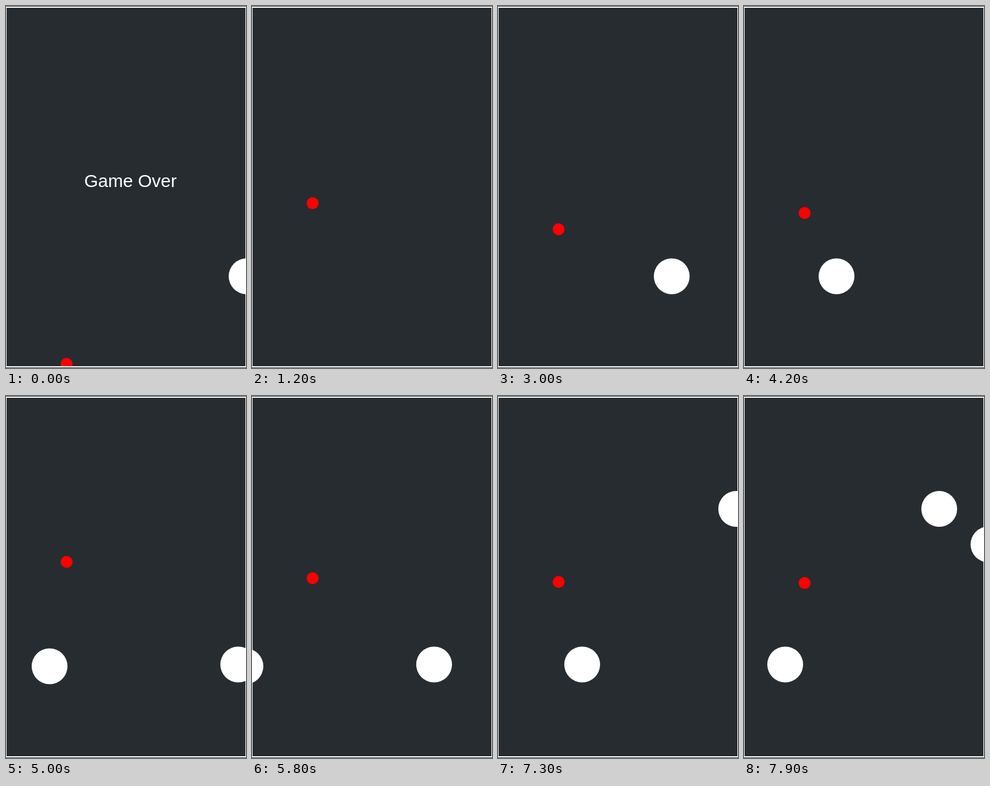
Write an HTML page with a canvas that moves like this. It is 402 px wide and 606 px high and loops after 8 s.

```html
<!DOCTYPE html>
<html lang="en">
<head>
<meta charset="utf-8">
<title>Bouncing ball game</title>
<style>
  html, body { margin: 0; width: 100%; height: 100%; overflow: hidden; background: #272c30; }
  canvas { display: block; }
</style>
</head>
<body>
<canvas id="stage" width="402" height="606"></canvas>
<script>
const ctx = document.getElementById('stage').getContext('2d');
const LOOP = 8, STEP = 0.1, RESTART = 0.5; // seconds
const BACKGROUND = '#272c30';

const START_Y = 305.5, GRAVITY = 0.1, LIFT = -3, SCROLL = 2;
const FLAP_TICKS = new Set([33, 94, 167, 183, 227, 249, 314, 376]);
const OVER = { tick: 99, y: 599 };

const OBSTACLES = [
  { x: 601, y: 452.5 },
  { x: 917, y: 449.5 },
  { x: 1175, y: 189 },
  { x: 1257.5, y: 248.5 },
];

// 60 ticks a second, dropping to 52 for a while in the middle.
function ticksAt(time) {
  const slowSpan = Math.min(Math.max(time - 3.7, 0), 3.1);
  return Math.round(60 * time - 25.4 - 8 * slowSpan);
}

function playerY(ticks) {
  let y = START_Y, velocity = 0;
  for (let tick = 0; tick < ticks; tick++) {
    if (FLAP_TICKS.has(tick)) velocity = LIFT;
    velocity += GRAVITY;
    y += velocity;
  }
  return y;
}

function disc(x, y, radius, color) {
  ctx.fillStyle = color;
  ctx.beginPath();
  ctx.arc(x, y, radius, 0, Math.PI * 2);
  ctx.fill();
}

function rect(x, y, width, height, color) {
  ctx.fillStyle = color;
  ctx.fillRect(x, y, width, height);
}

function draw(time) {
  const over = time < RESTART;
  const tick = over ? OVER.tick : ticksAt(time);

  rect(0, 0, 402, 606, BACKGROUND);
  rect(0, 1, 402, 604, '#fff');
  rect(1, 3, 400, 600, BACKGROUND);

  ctx.save();
  ctx.beginPath();
  ctx.rect(1, 3, 400, 600);
  ctx.clip();
  for (const { x, y } of OBSTACLES) disc(x - SCROLL * tick, y, 30, '#fff');
  disc(101.5, over ? OVER.y : playerY(tick), 10, '#f00');
  if (over) {
    ctx.fillStyle = '#fff';
    ctx.font = '30px "Liberation Sans", Arial, sans-serif';
    ctx.fillText('Game Over', 131, 303);
  }
  ctx.restore();
}

function frame() {
  const time = performance.now() / 1000 % LOOP;
  draw(Math.floor(time / STEP + 1e-6) * STEP);
  requestAnimationFrame(frame);
}
frame();
</script>
</body>
</html>
```
